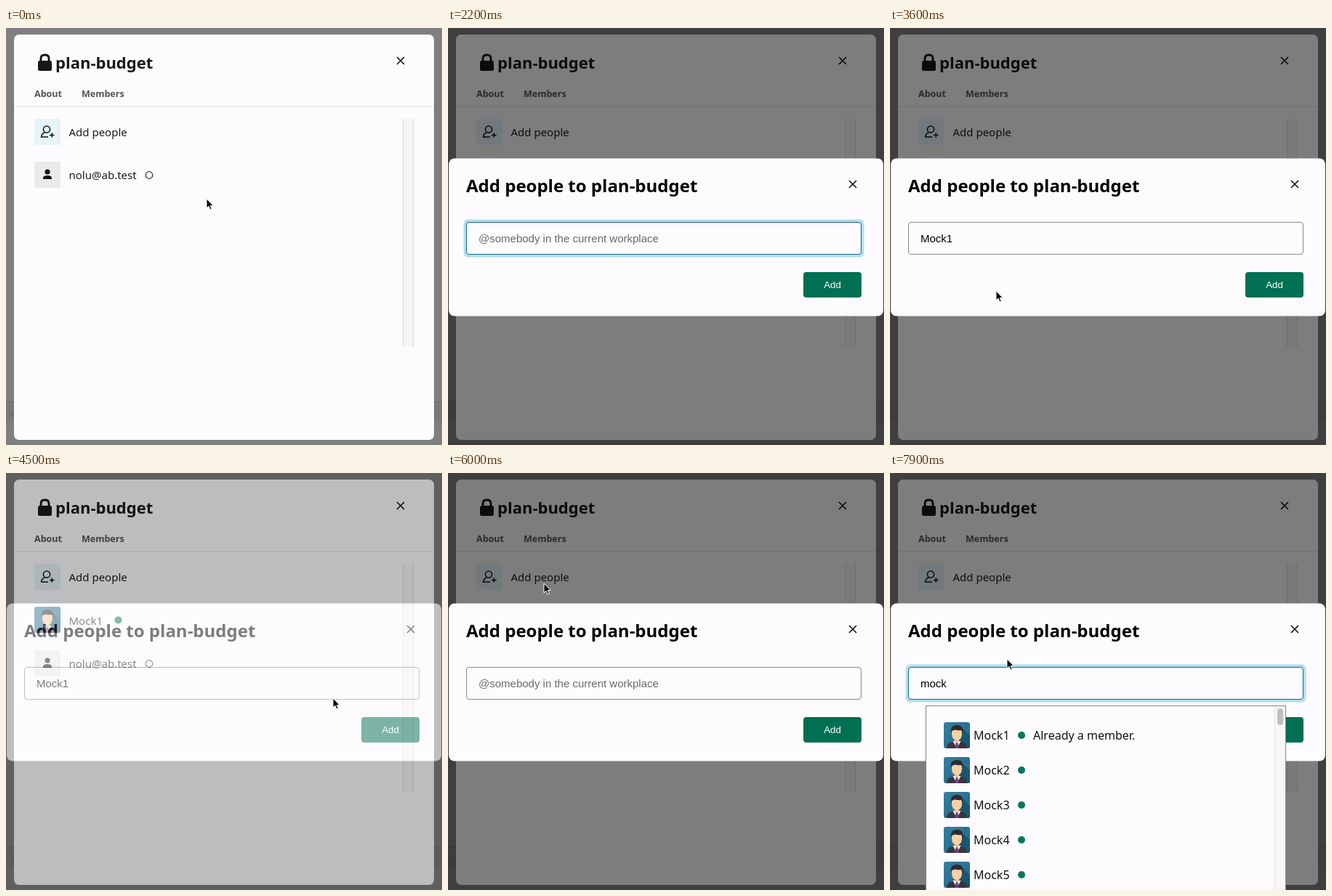
Write an HTML page that moves like this. It is 600 by 574 pixels and loops after 8 s.

```html
<!DOCTYPE html>
<html lang="en">
<head>
<meta charset="utf-8">
<style>
html, body { margin: 0; width: 100%; height: 100%; overflow: hidden; }
svg { display: block; font: 15px "Noto Sans", sans-serif; fill: #111; }
.line { fill: none; stroke: #111; stroke-width: 1.6; }
.tab { font-size: 12.5px; font-weight: 600; fill: #555356; }
.member { font-weight: 500; fill: #1d1c1d; }
.option { font-size: 16px; }
.field { font: 15px "Liberation Sans", Arial, sans-serif; }
</style>
</head>
<body>
<svg width="600" height="574" viewBox="0 0 600 574">
  <defs>
    <linearGradient id="teal" x2="1" y2="1">
      <stop stop-color="#377f9f"/><stop offset="1" stop-color="#1f6583"/>
    </linearGradient>
    <clipPath id="tile"><rect width="36" height="36" rx="3"/></clipPath>
    <g id="avatar" clip-path="url(#tile)">
      <path fill="url(#teal)" d="M0 0h36v36H0z"/>
      <path fill="#1b5671" d="M26 9l10 10v17H18z"/>
      <path fill="#38363d" d="M4 36q0-8 8-9l6-1 6 1q8 1 8 9z"/>
      <path fill="#fff" d="M12.500 26h11L18 36z"/>
      <path fill="#75408c" d="M16.500 28h3l1 8h-5z"/>
      <path fill="#efb98c" d="M15 21h6v5l-3 3-3-3z"/>
      <path fill="#f9cfa4" d="M11 11h14v6q-1 8-7 8t-7-8z"/>
      <path fill="#30292e" d="M10 16q-2-11 7-12 11-1 9 12l-2-5q-7 1-9-2-1 3-4 3z"/>
    </g>
    <path id="close" class="line" d="M-5-5 5 5M5-5-5 5"/>
  </defs>

  <path fill="#807f80" d="M0 0h600v574H0z"/>
  <path fill="#7a797a" d="M0 515h600v26H0z"/>
  <path fill="#6d6c6d" d="M0 514h600v1H0zM6 534l4-4v4z"/>
  <rect x="11" y="9" width="578" height="558" rx="7" fill="#fdfbfe"/>
  <rect x="44" y="45" width="19" height="14" rx="2.500" fill="#18171a"/>
  <path class="line" style="stroke-width:2.800" d="M48 46v-4q0-5 5.500-5t5.500 5v4"/>
  <text x="68" y="56" font-size="22" font-weight="700" fill="#18171a">plan-budget</text>
  <use href="#close" x="543" y="45"/>
  <text class="tab" x="39" y="95">About</text>
  <text class="tab" x="104" y="95">Members</text>
  <path fill="#dedce0" d="M11 107.500h578v1H11z"/>
  <path fill="#f6f4f7" d="M546 125h15v314h-15z"/>
  <path fill="#dddbde" d="M546 125h1v314h-1zM560 125h1v314h-1z"/>
  <rect x="39" y="125" width="36" height="36" rx="3" fill="#e6f3f9"/>
  <g class="line" style="stroke-width:1.500">
    <circle cx="56" cy="139.500" r="4.600"/>
    <path d="M53 144q-4 1.500-4.500 6H58M60 147.500h6.500M63.200 144.200v6.600"/>
  </g>
  <text class="member" x="86.500" y="148.500">Add people</text>

  <g id="newMember">
    <use href="#avatar" x="39" y="184"/>
    <text class="member" x="86.500" y="208.500">Mock1</text>
    <circle cx="154.500" cy="202.500" r="5" fill="#04785a"/>
  </g>
  <g id="oldMember">
    <rect x="39" y="184" width="36" height="36" rx="3" fill="#ebe9ec"/>
    <circle cx="57" cy="198" r="3.600"/>
    <path d="M51 208v-1.500q0-3.500 6-3.500t6 3.500v1.500z"/>
    <text class="member" x="86.500" y="208">nolu@ab.test</text>
    <circle class="line" style="stroke:#333;stroke-width:1.200" cx="197" cy="202.500" r="4.800"/>
  </g>

  <g id="dialog">
    <path fill="#000" fill-opacity=".5" d="M0 0h600v574H0z"/>
    <rect x="1" y="179.500" width="598" height="217" rx="8" fill="#fdfbfe"/>
    <text x="25" y="226" font-size="24" font-weight="700" fill="#000">Add people to plan-budget</text>
    <use href="#close" x="557" y="215"/>
    <rect id="ring" x="21.500" y="263.500" width="551" height="52" rx="6" fill="#b0def1"/>
    <rect id="box" x="25.500" y="267.500" width="543" height="44" rx="3.500" fill="#fdfbfe"/>
    <text id="value" class="field" x="42" y="295"></text>
    <path id="caret" d="M0 281h1v17H0z"/>
    <rect x="489" y="336" width="80" height="35" rx="4" fill="#007052"/>
    <text x="529" y="358" text-anchor="middle" fill="#fff" style="font:13.333px 'Liberation Sans',Arial,sans-serif">Add</text>
    <g id="menu">
      <rect x="49.500" y="320.500" width="495" height="270" fill="#fdfbfe" stroke="#858386"/>
      <path fill="#f8f6f9" d="M530 321h14v253h-14z"/>
      <path fill="#e4e2e5" d="M529 321h1v253h-1z"/>
      <rect x="533" y="324" width="8" height="23" rx="4" fill="#c0bec1"/>
      <g id="options"></g>
      <text id="note" class="option" x="197" y="367">Already a member.</text>
    </g>
  </g>

  <g id="cursor">
    <path id="arrow" fill="#000" stroke="#fff" d="M0 0V13L3 10.200 5 15 7.200 14 5.200 9.500H9.200Z"/>
    <path id="hand" fill="#fff" stroke="#000" stroke-width="1.200" stroke-linejoin="round"
      d="M-1.500 1.500q1.500-2.500 3 0v5q2-1 3 .6 2-.6 2.500.8 2-.3 2.200 1.700v4l-1.800 4.500h-7l-5.500-7.500q.2-2.200 2-1.500l1.600 1.500z"/>
    <path id="beam" class="line" style="stroke-width:1" d="M-3-7.500q3 0 3 2v11q0 2-3 2M3-7.500q-3 0-3 2v11q0 2 3 2"/>
  </g>
</svg>
<script>
const LOOP = 8000, STEP = 100;
const $ = id => document.getElementById(id);
const show = (id, on) => $(id).style.display = on ? '' : 'none';
const clamp = v => Math.max(0, Math.min(1, v));

// time, x, y, shape from that time on
const path = [
  [0, 276, 235, 'arrow'], [100, 150, 172, 'arrow'], [200, 77, 131, 'hand'], [400, 77, 131, 'hand'],
  [500, 79, 139, 'arrow'], [700, 82, 153, 'arrow'], [1200, 118, 240, 'arrow'],
  [1400, 140, 288, 'beam'], [1700, 146, 288, 'beam'], [1800, 150, 245, 'arrow'],
  [2000, 160, 151, 'arrow'], [2100, 160, 151, ''],
  [2900, 160, 151, 'arrow'], [3000, 160, 151, 'arrow'], [3400, 146, 362, 'arrow'], [3600, 146, 362, 'arrow'],
  [4100, 520, 352, 'hand'], [4400, 520, 352, 'hand'], [4500, 450, 310, 'arrow'], [4800, 276, 205, 'arrow'],
  [5000, 150, 160, 'hand'], [5100, 132, 150, 'hand'], [5900, 132, 150, 'hand'],
  [6000, 132, 152, 'arrow'], [6400, 150, 256, 'arrow'], [6500, 152, 287, 'beam'], [6700, 152, 287, ''],
  [7500, 168, 219, 'arrow'], [7900, 161, 256, 'arrow'], [8000, 161, 256, 'arrow']
];

// one pass through the dialog
const visits = [
  { open: 400, focus: 1500, type: 2300, menu: 2500, pick: 3500, close: 4400 },
  { open: 5900, focus: 6500, type: 7000, menu: 7200, pick: 9000, close: 9000 }
];
const WORD = 'mock', KEY = 100;

for (let i = 0; i < 5; i++) {
  const y = 343 + i * 48;
  $('options').innerHTML += `<use href="#avatar" x="74" y="${y}"/>
    <text class="option" x="115" y="${y + 24}">Mock${i + 1}</text>
    <circle cx="181" cy="${y + 18}" r="5" fill="#04785a"/>`;
}

function drawCursor(t) {
  const i = path.findLastIndex(p => p[0] <= t);
  const [t0, x0, y0, shape] = path[i];
  const [t1, x1, y1] = path[i + 1];
  const k = (t - t0) / (t1 - t0);
  $('cursor').setAttribute('transform', `translate(${x0 + (x1 - x0) * k} ${y0 + (y1 - y0) * k})`);
  for (const id of ['arrow', 'hand', 'beam']) show(id, id === shape);
}

function drawDialog(t) {
  const visit = visits.findLast(v => t >= v.open);
  const opacity = visit ? clamp((t - visit.open + 100) / 200) * clamp((visit.close + 200 - t) / 200) : 0;
  show('dialog', opacity);
  if (!opacity) return;
  $('dialog').style.opacity = opacity;

  const picked = t >= visit.pick;
  const focused = t >= visit.focus && !picked;
  const typed = WORD.slice(0, Math.max(0, Math.floor((t - visit.type) / KEY) + 1));
  const text = picked ? 'Mock1' : typed;
  $('value').textContent = text || '@somebody in the current workplace';
  $('value').style.fill = text ? '#000' : '#6b696c';
  show('ring', focused);
  $('box').setAttribute('stroke', focused ? '#1b6686' : '#8b898c');

  const lastKey = visit.type + (WORD.length - 1) * KEY;
  const since = t < visit.type ? t - visit.focus - 200 : t - lastKey;
  show('caret', focused && (since < 0 || since % 1000 < 500));
  const width = typed ? $('value').getComputedTextLength() : 0;
  $('caret').setAttribute('transform', `translate(${42 + Math.round(width)} 0)`);
  show('menu', t >= visit.menu && !picked);
  show('note', visit === visits[1]);
}

function frame(now) {
  const t = Math.floor(now % LOOP / STEP) * STEP;
  const joined = t >= visits[0].close;
  show('newMember', joined);
  $('oldMember').setAttribute('transform', `translate(0 ${joined ? 60 : 0})`);
  drawDialog(t);
  drawCursor(t);
  requestAnimationFrame(frame);
}
requestAnimationFrame(frame);
</script>
</body>
</html>
```
